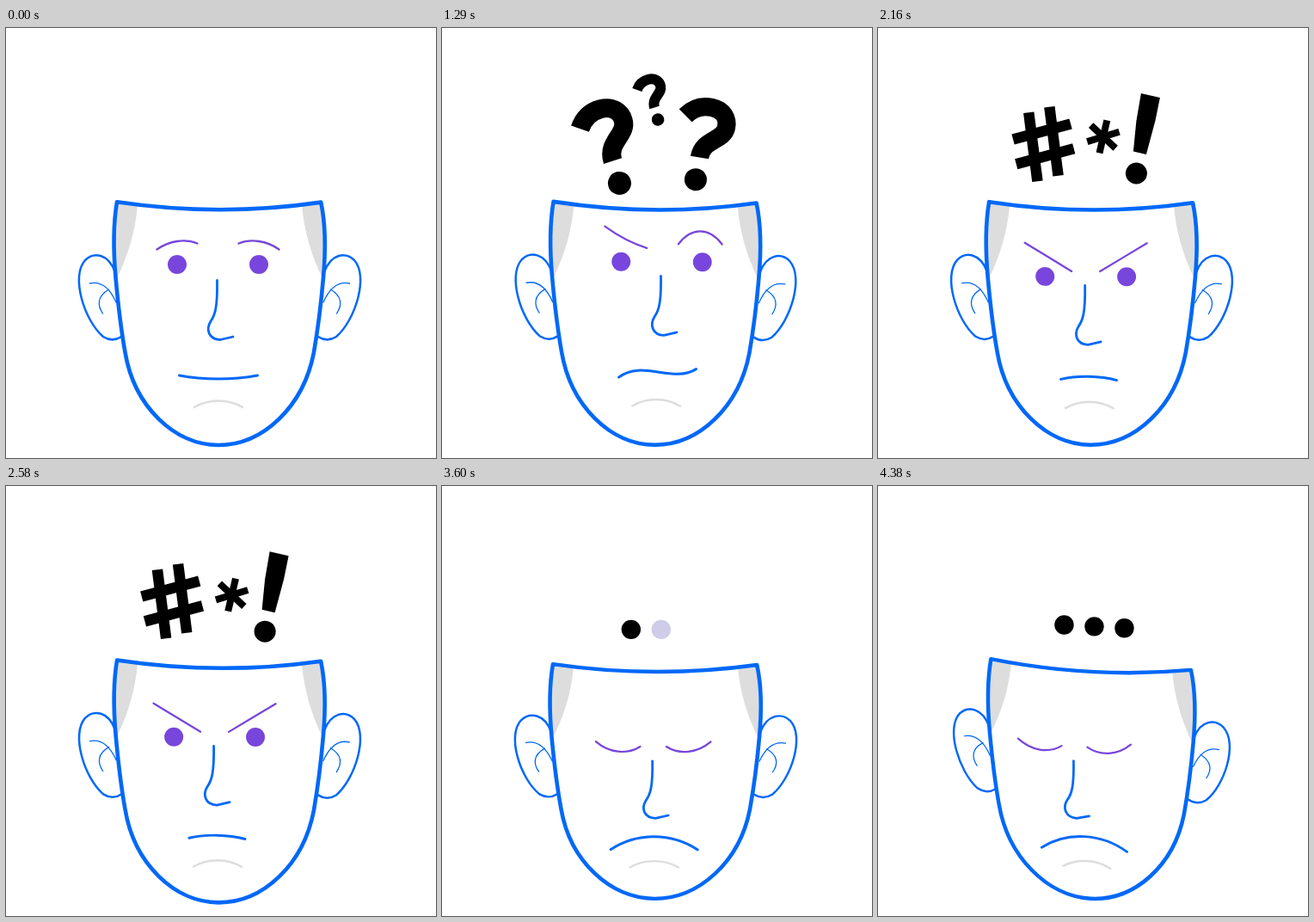
Recreate the animation shown at these times as an HTML page with a canvas. Size 500 px wide and 500 px high, loop 4.41 s.

```html
<!DOCTYPE html>
<html lang="en">
<head>
<meta charset="utf-8">
<title>Moods</title>
<style>
html, body { margin: 0; width: 100%; height: 100%; overflow: hidden; background: #fff; }
canvas { display: block; width: 100vmin; height: 100vmin; }
</style>
</head>
<body>
<canvas id="stage"></canvas>
<script>
const LOOP = 4410, STEP = 30, SIZE = 500, MORPH = 370;
const BLUE = '#0068f8', PURPLE = '#7846dc', GRAY = '#ddd';
const CX = 248.5, CY = 343.5;
const EYE_MID = 246.5, EYE_GAP = 47.5;
const canvas = document.getElementById('stage');
const ctx = canvas.getContext('2d');

// brow: inset, y, half width, slope, bend
// mouth: y, half width, slope, bend, wave
// from, to: yaw and pitch of the head; late: how long the turn is held back
const moods = [
  {
    start: 0, from: [0, 0], to: [0, 0], late: 1,
    brow: [0, 254, 23.5, -3.5, -8], mouth: [404, 45.5, 0, 5.3, 0], eyes: [275, 1]
  },
  {
    start: 420, from: [0.11, -0.005], to: [0.087, -0.102], late: 1,
    brow: [5.5, 248.5, 24.5, 12.5, 3], rightBrow: [2.5, 256.2, 25.5, 0, -20],
    mouth: [403.5, 45.2, -5, -2, 16], eyes: [277, 1]
  },
  {
    start: 1770, from: [-0.053, 0.063], to: [-0.03, 0.13], late: 1,
    brow: [3.7, 260.4, 27.3, 16.5, 0], mouth: [406.8, 32.5, 0.5, -5, 0], eyes: [283, 1]
  },
  {
    start: 3130, from: [-0.009, 0.267], to: [-0.197, 0.267], late: 7,
    brow: [6.5, 273, 25.8, 3, 12], mouth: [415.9, 50.6, 0, -21, 0], eyes: [281, 0]
  }
];
moods.forEach((m, i) => {
  m.end = (i < 3 ? moods[i + 1].start : LOOP) - STEP;
  m.rightBrow = m.rightBrow || m.brow;
});

const clamp = v => Math.min(1, Math.max(0, v));
const ease = v => v * v * (3 - 2 * v);
const ramp = (t, start, length) => clamp((t - start) / length);
const mix = (a, b, k) => a.map((v, i) => v + (b[i] - v) * k);

function faceAt(t) {
  let i = 3;
  while (t < moods[i].start) i--;
  const mood = moods[i], last = moods[Math.max(0, i - 1)];
  const k = ease(ramp(t, mood.start, MORPH));
  const settled = mood.start + MORPH;
  const turn = ramp(t, settled, mood.end - settled) ** mood.late;
  const face = {};
  for (const part of ['brow', 'rightBrow', 'mouth', 'eyes']) face[part] = mix(last[part], mood[part], k);
  [face.yaw, face.pitch] = mix(last.to, mix(mood.from, mood.to, turn), k);
  return face;
}

// Flat layer at depth z of the turned head.
function layer({ yaw, pitch }, z, draw) {
  const sx = Math.sqrt(1 - yaw * yaw), sy = Math.sqrt(1 - pitch * pitch);
  const skew = -pitch * yaw;
  ctx.save();
  ctx.transform(sx, skew, 0, sy, CX * (1 - sx) + z * yaw, CY * (1 - sy) + z * pitch - skew * CX);
  draw();
  ctx.restore();
}

function stroke(path, color, width) {
  ctx.strokeStyle = color;
  ctx.lineWidth = width;
  ctx.stroke(path);
}

// Line of a given half width and slope, bowed by bend and rippled by wave.
function bow(x, y, w, slope, bend, wave = 0) {
  const path = new Path2D(), h = 0.4;
  path.moveTo(x - w, y - slope);
  path.bezierCurveTo(
    x - w * h, y - slope * h + bend - wave,
    x + w * h, y + slope * h + bend + wave,
    x + w, y + slope);
  return path;
}

function disc(x, y, r, ry = r) {
  ctx.beginPath();
  ctx.ellipse(x, y, r, ry, 0, 0, 7);
  ctx.fill();
}

function pair(d) {
  const path = new Path2D(d);
  path.addPath(new Path2D(d), new DOMMatrix([-1, 0, 0, 1, CX * 2, 0]));
  return path;
}

const skull = new Path2D(`M129 202.3Q248 220 366.2 202.6
  C372.5 232 371.5 262 369 290C366.5 319 362 354 358 377
  C346 440 299 485 247 485C196 485 149 440 138.5 377
  C134 352 130 318 127.5 290C125 262 124 232 129 202.3Z`);
const hair = pair('M129 202L153 206Q149 250 129.5 290L127.5 290C125 262 124 232 129 202Z');
const ear = pair('M127 284C119 262 102 260 92 270C75 289 91 340 113 359C121 364 128 363 134 359');
const earFold = pair('M97.5 297Q116.5 293 128 319M119.5 304C106 312 106 322 112.5 332');
const nose = new Path2D('M245.5 293.5C246 325 243 334 238 341C232 351 236 362 249 362.5L264 359');
const chin = bow(247, 441, 28, 0, -10);
const hook = new Path2D('M-28 -73C-20 -85 -9 -89 1 -89C15 -89 23 -80 23 -69C23 -52 -2 -50 -1 -27');
const bang = new Path2D('M306 76L328 81L322.5 108L312 147L297 143.5L300.5 108Z');

function drawHead(face) {
  ctx.lineCap = ctx.lineJoin = 'round';
  layer(face, 0, () => {
    stroke(ear, BLUE, 2.5);
    stroke(earFold, BLUE, 1.3);
    ctx.fillStyle = '#fff';
    ctx.fill(skull);
    ctx.fillStyle = GRAY;
    ctx.fill(hair);
    stroke(skull, BLUE, 4.6);
  });
  layer(face, 22, () => stroke(chin, GRAY, 2.5));
  layer(face, 36, () => stroke(bow(247, ...face.mouth), BLUE, 3));
  layer(face, 92, () => {
    const [eyeY, open] = face.eyes;
    ctx.fillStyle = PURPLE;
    for (const side of [-1, 1]) {
      const [inset, y, w, slope, bend] = side < 0 ? face.brow : face.rightBrow;
      if (open > 0.01) disc(EYE_MID + side * EYE_GAP, eyeY, 11, 11 * open);
      stroke(bow(EYE_MID + side * (EYE_GAP - inset), y, w, -side * slope, bend), PURPLE, 2.3);
    }
    stroke(nose, BLUE, 2.8);
  });
}

function question(x, y, angle, scale) {
  ctx.translate(x, y);
  ctx.rotate(angle * Math.PI / 180);
  ctx.scale(scale, scale);
  stroke(hook, '#000', 22);
  disc(0, 0, 13.5);
}

function bar(x, y, dx, dy, width) {
  ctx.lineWidth = width;
  ctx.beginPath();
  ctx.moveTo(x - dx, y - dy);
  ctx.lineTo(x + dx, y + dy);
  ctx.stroke();
}

function hash() {
  const ax = 33.5, ay = -9, bx = 5.1, by = 40;
  for (const k of [-0.36, 0.36]) {
    bar(192.5 + ax * k, 134.8 + ay * k, bx, by, 12.5);
    bar(192.5 + bx * k, 134.8 + by * k, ax, ay, 12.5);
  }
}

function star() {
  for (let i = 0; i < 3; i++) {
    const a = (60 * i - 17) * Math.PI / 180;
    bar(262, 126.5, 19.5 * Math.cos(a), 19.5 * Math.sin(a), 8);
  }
}

function shout() {
  ctx.fill(bang);
  disc(300.5, 169, 12.5);
}

// Marks fade in one after another, float by dx, dy and fade out with the mood.
function showMarks(t, mood, first, gap, marks) {
  const shown = mood.start + MORPH + 80;
  const k = (t - shown) / (mood.end - shown);
  marks.forEach(([dx, dy, draw], i) => {
    const alpha = ramp(t, first + gap * i, 150) * (1 - ramp(t, mood.end + STEP, 150));
    if (alpha <= 0) return;
    ctx.save();
    ctx.globalAlpha = alpha;
    ctx.fillStyle = ctx.strokeStyle = '#000';
    ctx.lineCap = 'butt';
    ctx.translate(dx * k, dy * k);
    draw(alpha);
    ctx.restore();
  });
}

function drawMarks(t, face) {
  const [, puzzled, angry, sad] = moods;
  showMarks(t, puzzled, 540, 90, [
    [3, 5, () => question(205, 178, -15, 1)],
    [-3, -1, () => question(252.5, 107, -14, 0.54)],
    [3, 2, () => question(293.5, 175.3, 12, 0.965)]
  ]);
  showMarks(t, angry, 1890, 60, [
    [1.5, -2, hash],
    [1.5, 0.5, star],
    [1.5, 0.5, shout]
  ]);
  const dots = [-1, 0, 1].map(i => [0, -4, alpha => {
    const fade = 1 - alpha;
    ctx.fillStyle = `rgb(${15 * fade},0,${175 * fade})`;
    disc(255 + 35 * i + 18 * face.yaw, 167 - face.pitch * face.yaw * (35 * i + 7), 11.2);
  }]);
  showMarks(t, sad, 3420, 150, dots);
}

function fit() {
  const side = Math.round(Math.min(innerWidth, innerHeight) * devicePixelRatio) || SIZE;
  if (canvas.width !== side) canvas.width = canvas.height = side;
  ctx.setTransform(side / SIZE, 0, 0, side / SIZE, 0, 0);
}

let begin;
function frame(now) {
  if (begin === undefined) begin = now;
  const t = Math.floor(((now - begin) % LOOP) / STEP) * STEP;
  const face = faceAt(t);
  fit();
  ctx.fillStyle = '#fff';
  ctx.fillRect(0, 0, SIZE, SIZE);
  drawHead(face);
  drawMarks(t, face);
  requestAnimationFrame(frame);
}
requestAnimationFrame(frame);
</script>
</body>
</html>
```
